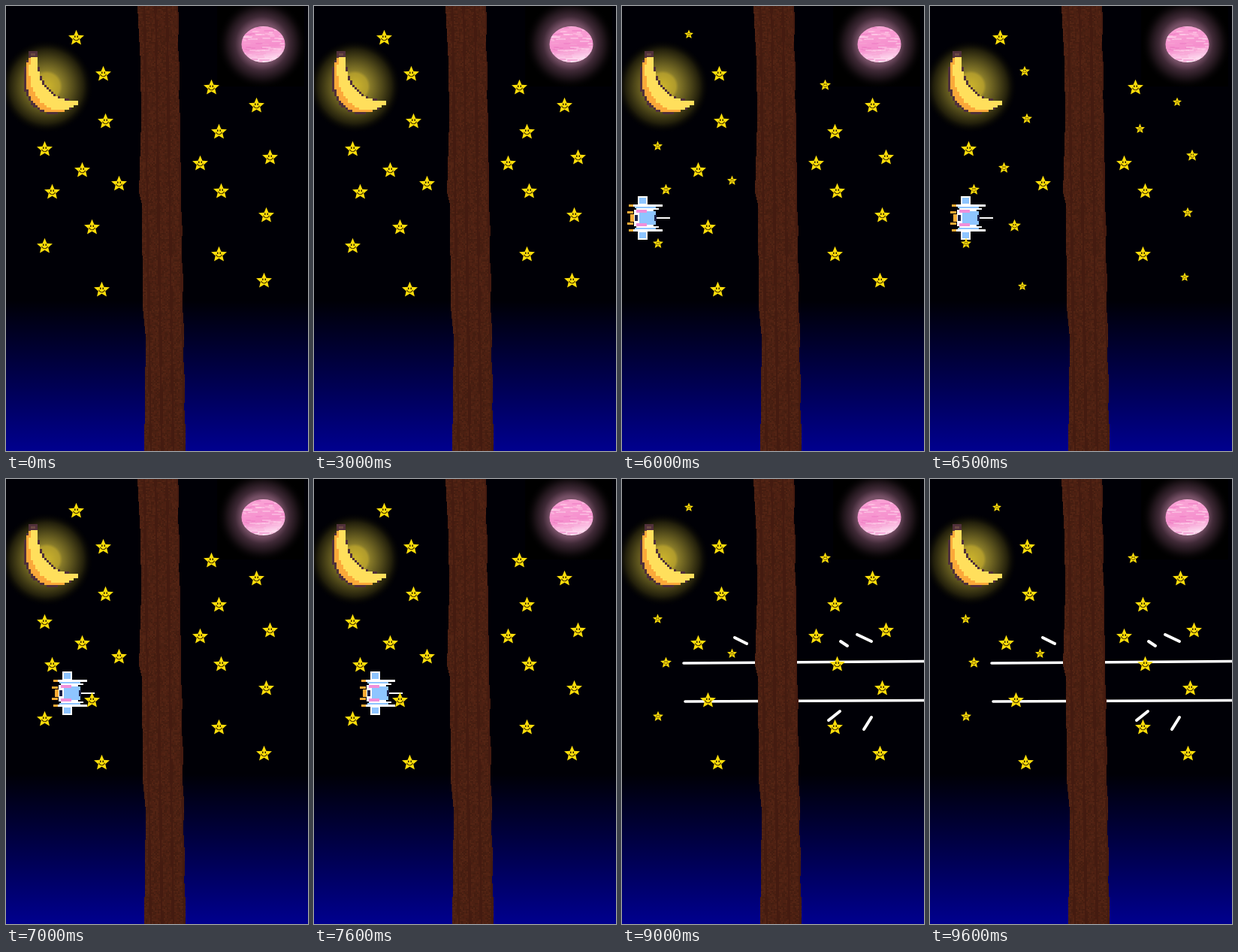
An HTML page with a canvas for the animation above (10000 ms loop, 402 by 592 pixels).

```html
<!DOCTYPE html>
<html lang="en">
<head>
<meta charset="utf-8">
<title>Night sky</title>
<style>
html, body { margin: 0; width: 100%; height: 100%; overflow: hidden; background: #000; }
canvas { display: block; width: 402px; height: 592px; }
</style>
</head>
<body>
<canvas id="stage" width="402" height="592"></canvas>
<script>
const W = 402, H = 592, LOOP = 10000, STAR = 21;
const stage = document.getElementById('stage').getContext('2d');

let seed = 7;
function rand() {
  seed = (seed * 16807) % 2147483647;
  return seed / 2147483647;
}
const pick = list => list[Math.floor(rand() * list.length)];

function layer(draw) {
  const c = document.createElement('canvas');
  c.width = W;
  c.height = H;
  draw(c.getContext('2d'));
  return c;
}

function glow(g, x, y, r, stops) {
  const grad = g.createRadialGradient(x, y, 0, x, y, r);
  stops.forEach(([at, color]) => grad.addColorStop(at, color));
  g.fillStyle = grad;
  g.fillRect(x - r, y - r, 2 * r, 2 * r);
}

// Crescent between two curves, moved inward by `outer` and `inner`.
function crescent(outer, inner) {
  const p = new Path2D(), d = outer * 1.3;
  p.moveTo(32 + outer / 4, 66);
  p.bezierCurveTo(8 + d, 100, 34 + d, 172 - d, 95, 131);
  p.lineTo(95, 126 + inner / 2);
  p.bezierCurveTo(62 - inner, 124 + inner, 44 - inner, 106 + inner, 42 - inner / 2, 66);
  return p;
}

function drawBanana(g) {
  const cell = 3;
  const coats = [[crescent(0, 0), '#50303a'], [crescent(3, 2), '#fba93a'], [crescent(10, 2), '#ffdf5c']];
  for (const [path, color] of coats) {
    g.fillStyle = color;
    for (let y = 60; y < 147; y += cell)
      for (let x = 21; x < 99; x += cell)
        if (g.isPointInPath(path, x + cell / 2, y + cell / 2)) g.fillRect(x, y, cell, cell);
  }
  g.fillStyle = '#50303a';
  g.fillRect(30, 60, 12, 8);
  g.fillStyle = '#6b4a42';
  g.fillRect(33, 63, 6, 3);
}

function drawPlanet(g) {
  g.save();
  g.beginPath();
  g.ellipse(342.5, 51, 29, 24, 0, 0, 7);
  g.clip();
  const grad = g.createLinearGradient(336, 27, 344, 75);
  grad.addColorStop(0, '#fba3d6');
  grad.addColorStop(0.6, '#f58fcd');
  grad.addColorStop(1, '#ffeaf6');
  g.fillStyle = grad;
  g.fillRect(312, 26, 62, 50);
  g.globalAlpha = 0.5;
  for (let i = 0; i < 90; i++) {
    g.fillStyle = pick(['#ffc4e4', '#ee7dc4', '#f8a4d4', '#ffd4ec']);
    g.fillRect(308 + rand() * 60, 26 + Math.floor(rand() * 48), 4 + rand() * 10, 2);
  }
  g.restore();
}

const sky = layer(g => {
  const dusk = g.createLinearGradient(0, 392, 0, H);
  dusk.addColorStop(0, '#000006');
  dusk.addColorStop(1, '#00008e');
  g.fillStyle = dusk;
  g.fillRect(0, 0, W, H);
  glow(g, 54, 107, 62, [[0, '#cdb42c'], [0.28, '#b09b2c'], [0.34, '#877a29'],
    [0.6, '#4e4719'], [0.8, '#211e0b'], [1, 'rgba(0,0,0,0)']]);
  g.fillStyle = '#000';
  g.fillRect(281, 0, 116, 107);
  glow(g, 341, 50, 60, [[0, '#8d6079'], [0.45, '#765066'], [0.6, '#402a37'],
    [0.8, '#170f13'], [1, 'rgba(0,0,0,0)']]);
  drawBanana(g);
  drawPlanet(g);
});

const trunk = layer(g => {
  const left = [[0, 175], [75, 179], [150, 180], [248, 177], [262, 181], [400, 182], [440, 186], [H, 184]];
  for (let y = 0; y < H; y += 2) {
    const i = left.findIndex(([end]) => end > y);
    const [[y0, x0], [y1, x1]] = [left[i - 1], left[i]];
    const from = Math.round(x0 + (x1 - x0) * (y - y0) / (y1 - y0));
    const to = Math.round(229 + y / 59 + Math.sin(y / 11) * 0.6);
    g.fillStyle = '#4c2013';
    g.fillRect(from, y, to - from, 2);
    for (let x = from; x < to; x += 2) {
      const groove = Math.sin((x - y / 70) * 0.42) > 0.8;
      g.globalAlpha = 0.45;
      g.fillStyle = groove ? '#3b160e' : pick(['#3d190f', '#5b2917', '#502113', '#472012']);
      g.fillRect(x, y, Math.min(2, to - x), 2);
    }
    g.globalAlpha = 1;
  }
});

// Position and the width each star shrinks to.
const stars = [[93, 42, 12], [129, 90, 14], [132, 153, 14], [51, 190, 13], [101, 218, 15],
  [150, 236, 13], [61, 247, 15], [114, 294, 17], [51, 319, 14], [127, 377, 12],
  [273, 108, 15], [333, 132, 12], [283, 167, 13], [351, 201, 16], [258, 209, 14],
  [286, 246, 12], [346, 278, 14], [283, 330, 14], [343, 365, 12]];

// Stars that shrink together.
const first = [1, 3, 9, 10, 12, 14, 15, 17];
const second = [0, 3, 5, 6, 8, 10];
const third = [1, 2, 4, 6, 7, 8, 9, 11, 12, 13, 16, 18];

const scenes = [
  { at: 0, dim: [] },
  { at: 5000, dim: first, ship: [-11, 250] },
  { at: 6000, dim: second, ship: [7, 253] },
  { at: 6500, dim: third, ship: [27, 253] },
  { at: 7000, dim: [], ship: [61, 256] },
  { at: 8000, dim: first, ship: [69, 253], boost: true },
  { at: 9000, dim: second, warp: true }
];

const starShape = new Path2D();
for (let i = 0; i < 10; i++) {
  const r = i % 2 ? 5 : 11, a = (i / 5 - 0.5) * Math.PI;
  starShape.lineTo(r * Math.cos(a), r * Math.sin(a) + 0.7);
}

// A smaller star keeps its top left corner in place.
function drawStar(x, y, size) {
  const g = stage, shift = (STAR - size) / 2;
  g.save();
  g.translate(x - shift + 0.5, y - shift);
  g.scale(size / STAR, size / STAR);
  g.fillStyle = '#ffde0a';
  g.fill(starShape);
  g.fillStyle = '#2c2000';
  g.fillRect(-2.5, -2.5, 1.5, 2.5);
  g.fillRect(1, -2.5, 1.5, 2.5);
  g.strokeStyle = '#4a3800';
  g.lineWidth = 1.1;
  g.beginPath();
  g.arc(0, -0.5, 4.2, 0.3, Math.PI - 0.3);
  g.stroke();
  g.restore();
}

function drawShip(x, y) {
  const g = stage;
  const rect = (color, rx, ry, w, h) => {
    g.fillStyle = color;
    g.fillRect(rx, ry, w, h);
  };
  // Draws a part and its reflection across the hull axis.
  const pair = (color, rx, ry, w, h) => {
    rect(color, rx, ry, w, h);
    rect(color, rx, 58 - ry - h, w, h);
  };
  const white = '#fff', blue = '#8ec5ff', pink = '#f08fda', flame = '#f9ab34', dark = '#1c2248';
  g.save();
  g.translate(x, y);
  pair(white, 14, 0, 13, 12);
  pair(blue, 16, 2, 9, 8);
  pair(white, 5, 11, 42, 3);
  pair(blue, 10, 14, 28, 2);
  pair(white, 12, 16, 30, 2);
  pair(flame, 2, 11, 6, 3);
  pair(flame, 0, 20, 8, 3);
  rect(flame, 4, 24, 8, 10);
  rect(white, 9, 18, 26, 22);
  rect(blue, 16, 20, 22, 18);
  pair(pink, 12, 18, 14, 4);
  rect(dark, 10, 25, 4, 8);
  rect(dark, 36, 25, 3, 8);
  rect(white, 39, 28, 18, 2);
  g.restore();
}

function strokes(lines, width) {
  stage.strokeStyle = '#fff';
  stage.lineWidth = width;
  stage.lineCap = 'round';
  for (const [x0, y0, x1, y1] of lines) {
    stage.beginPath();
    stage.moveTo(x0, y0);
    stage.lineTo(x1, y1);
    stage.stroke();
  }
}

function drawBoost() {
  const bands = ['#1c2040', '#1c2040', '#f07a18', '#ffc84a', '#f07a18'];
  for (let row = 0; row < 4; row++) {
    const x = row === 1 ? 38 : 48, w = row === 1 ? 22 : 18;
    bands.forEach((color, i) => {
      stage.fillStyle = color;
      stage.fillRect(x + i * w / 5, 257 + row * 12.5, w / 5 + 0.3, 7);
    });
  }
  strokes([[69, 236, 75, 238], [75, 238, 80, 244], [92, 241, 99, 245],
    [69, 315, 75, 317], [81, 324, 88, 323], [88, 323, 92, 319]], 4);
}

function drawWarp() {
  strokes([[82, 245, W, 242.5], [84, 296, W, 294.5]], 3.5);
  strokes([[150, 211, 166, 219], [291, 216, 300, 222], [313, 207, 332, 216],
    [275, 321, 290, 309], [322, 333, 332, 317]], 4);
}

function render(t) {
  const scene = scenes.filter(s => s.at <= t).pop();
  stage.drawImage(sky, 0, 0);
  if (scene.warp) drawWarp();
  stage.drawImage(trunk, 0, 0);
  if (scene.boost) drawBoost();
  if (scene.ship) drawShip(...scene.ship);
  stars.forEach(([x, y, low], i) => drawStar(x, y, scene.dim.includes(i) ? low : STAR));
}

const start = performance.now();
function tick() {
  render((performance.now() - start) % LOOP);
  requestAnimationFrame(tick);
}
tick();
</script>
</body>
</html>
```
